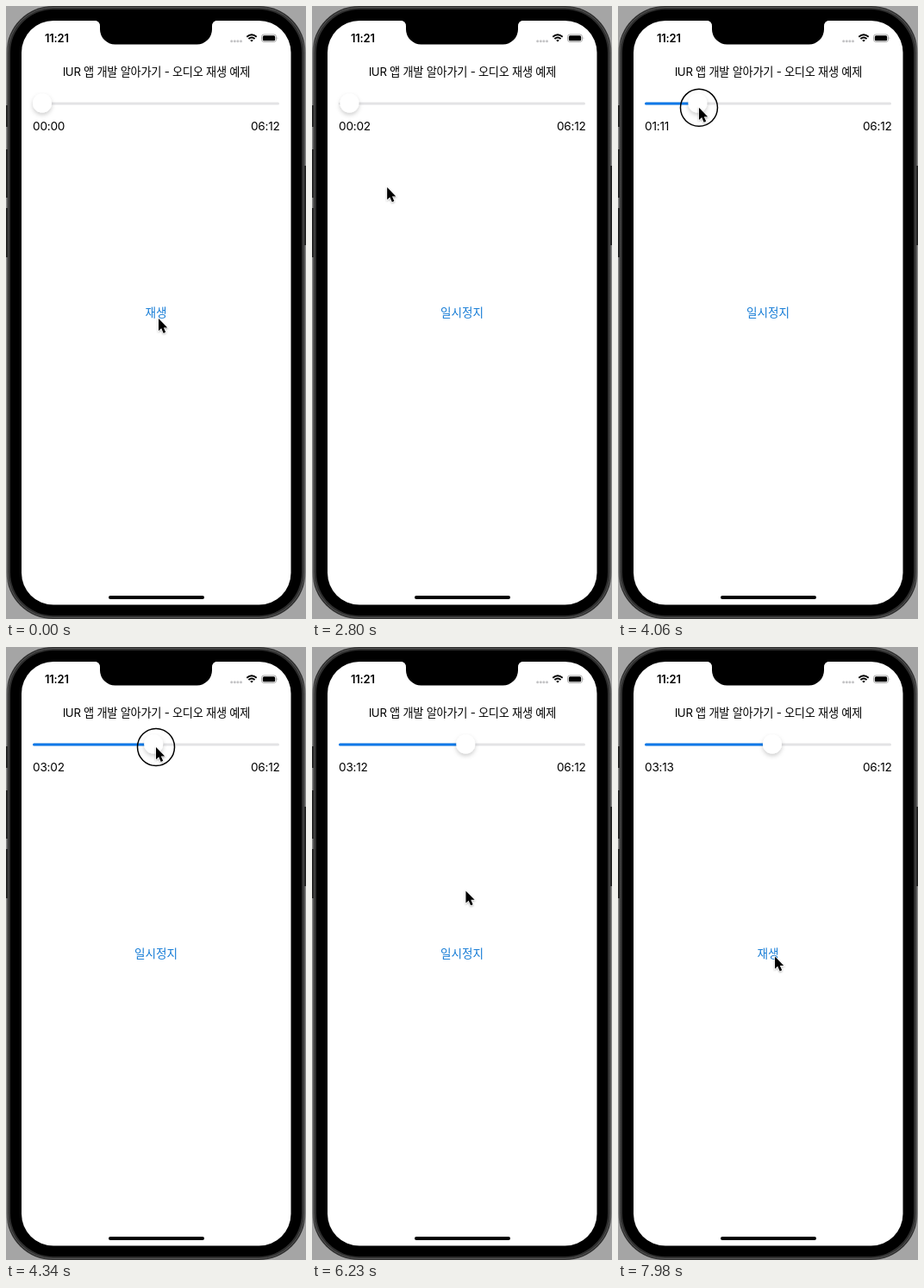
Write an HTML page that moves like this. It is 348 px wide and 710 px high and loops after 8 s.

```html
<!DOCTYPE html>
<html lang="ko">
<head>
<meta charset="utf-8">
<title>오디오 재생</title>
<style>
html, body { margin: 0; width: 100%; height: 100%; overflow: hidden; }
svg { display: block; width: 100%; height: 100%; }
text { font: 13.6px Inter, "Noto Sans CJK KR", "Noto Sans CJK", sans-serif; }
</style>
</head>
<body>
<svg viewBox="0 0 348 710">
  <defs>
    <linearGradient id="rim" x2="1" y2="0">
      <stop offset="0" stop-color="#6b6b6b"/>
      <stop offset=".008" stop-color="#2f2f2f"/>
      <stop offset=".992" stop-color="#2f2f2f"/>
      <stop offset="1" stop-color="#6b6b6b"/>
    </linearGradient>
    <filter id="soft" x="-50%" y="-50%" width="200%" height="200%">
      <feDropShadow dx="0" dy="2.5" stdDeviation="2.4" flood-opacity=".2"/>
    </filter>
    <filter id="lift" x="-50%" y="-50%" width="200%" height="200%">
      <feDropShadow dx="0" dy="1" stdDeviation=".8" flood-opacity=".35"/>
    </filter>
  </defs>

  <!-- phone body -->
  <rect width="348" height="710" fill="#a5a5a5"/>
  <rect x=".5" width="347" height="710" rx="54" fill="url(#rim)"/>
  <rect x="2" y="1.5" width="344" height="707" rx="53" fill="none" stroke="#555" />
  <path d="M0 115h2v25h-2zM0 166h2v56h-2zM0 234h2v57h-2zM346 185h2v92h-2z" fill="#222"/>
  <rect x="5" y="4" width="338" height="702" rx="50"/>
  <rect x="18" y="17" width="312.5" height="676.5" rx="37" fill="#fff"/>
  <path d="M102 16.5q7 .5 7 7v3.500a17.500 17.500 0 0 0 17.500 17.500h95a17.500 17.500 0 0 0 17.500-17.500v-3.500q0-6.500 7-7z"/>
  <rect x="119" y="683" width="111" height="4" rx="2"/>

  <!-- status bar -->
  <text x="45" y="42" style="font-size:13px;font-weight:600" textLength="" letter-spacing="-.2">11:21</text>
  <g fill="#c4c4c6">
    <circle cx="261.700" cy="40.700" r="1.500"/><circle cx="265.300" cy="40.700" r="1.500"/>
    <circle cx="268.900" cy="40.700" r="1.500"/><circle cx="272.500" cy="40.700" r="1.500"/>
  </g>
  <g fill="none" stroke="#000" stroke-width="1.900">
    <path d="M279.300 35.700q5.700-4.900 11.400 0M281.400 38.100q3.600-3 7.200 0"/>
    <path d="M283.200 39.700q1.800-1.300 3.600 0l-1.800 1.900z" fill="#000" stroke="none"/>
  </g>
  <rect x="296.500" y="33" width="17" height="8.500" rx="2.600" fill="none" stroke="#a0a0a0" stroke-width=".9"/>
  <rect x="297.800" y="34.300" width="14.400" height="5.900" rx="1.500"/>
  <path d="M314.600 35.700q1.600 1.500 0 3z" fill="#a0a0a0"/>

  <!-- player -->
  <text x="174.500" y="81" text-anchor="middle" style="font-size:13.2px" letter-spacing="-.25">lUR 앱 개발 알아가기 - 오디오 재생 예제</text>
  <rect x="31" y="111.500" width="286" height="3" rx="1.500" fill="#e3e3e5"/>
  <rect id="bar" x="31" y="111.500" height="3" rx="1.500" fill="#0a78e8"/>
  <circle id="knob" cy="112.500" r="11" fill="#fff" filter="url(#soft)"/>
  <text id="now" x="31" y="143.700" letter-spacing="-.2"></text>
  <text x="317.700" y="143.700" text-anchor="end" letter-spacing="-.2">06:12</text>
  <text id="button" x="174" y="360" text-anchor="middle" fill="#147bd6"></text>

  <g id="pointer">
    <circle id="ring" r="21.500" fill="none" stroke="#000" stroke-width="1.500"/>
    <path d="M0 0V14.200L3.200 11.300L5.700 16.900L8.200 15.800L5.800 10.400H10.200Z" stroke="#fff" stroke-width="1.100" paint-order="stroke" filter="url(#lift)"/>
  </g>
</svg>
<script>
const LOOP = 8000, TICK = 70, TOTAL = 372;
const $ = id => document.getElementById(id);
const [bar, knob, now, button, pointer, ring] =
  ["bar", "knob", "now", "button", "pointer", "ring"].map($);

const linear = u => u;
const smooth = u => u * u * (3 - 2 * u);

// Pointer stops: time, x, y, easing towards the stop
const path = [
  [0, 177, 362, linear],
  [2310, 177, 362, linear],
  [3150, 33, 118.5, smooth],
  [3290, 42, 118, linear],
  [3430, 41.5, 118.5, linear],
  [3850, 42, 119, linear],
  [4340, 174, 116, smooth],
  [4550, 179.8, 116, smooth],
  [4620, 179, 117, linear],
  [5670, 179, 117, linear],
  [5740, 176, 125, linear],
  [6510, 179.5, 350, smooth],
  [6650, 182, 358.5, linear],
  [LOOP, 182, 358.5, linear]
];

function pointerAt(t) {
  const i = path.findIndex(p => p[0] > t);
  const [t0, x0, y0] = path[i - 1], [t1, x1, y1, ease] = path[i];
  const u = ease((t - t0) / (t1 - t0));
  return [x0 + (x1 - x0) * u, y0 + (y1 - y0) * u];
}

// Playback position in seconds; the pointer sets it while dragging
function secondsAt(t, x) {
  if (t < 3430) return (t >= 1680) + (t >= 2730);
  if (t < 4620) return Math.max(0, (x - 42) * 182 / 132);
  return 190 + (t >= 4830) + (t >= 5880) + (t >= 6930);
}

const within = (t, a, b) => t >= a && t < b;
const pad = n => String(n).padStart(2, "0");

function draw(time) {
  const t = Math.floor(time / TICK) * TICK;
  const [x, y] = pointerAt(t);
  const sec = Math.floor(secondsAt(t, x) + 1e-6);
  const cx = 42 + sec / TOTAL * 264;

  pointer.setAttribute("transform", `translate(${x} ${y})`);
  const pressed = within(t, 420, 490) || within(t, 3430, 4620) || within(t, 7070, 7210);
  ring.style.display = pressed ? "" : "none";

  knob.setAttribute("cx", cx);
  bar.setAttribute("width", sec > 5 ? cx - 31 : 0);
  now.textContent = pad(Math.floor(sec / 60)) + ":" + pad(sec % 60);

  button.textContent = within(t, 490, 7210) ? "일시정지" : "재생";
  button.setAttribute("opacity", within(t, 7210, 7350) ? 0.5 + (t - 7210) / 280 : 1);
}

const start = performance.now();
function tick() {
  draw((performance.now() - start) % LOOP);
  requestAnimationFrame(tick);
}
draw(0);
requestAnimationFrame(tick);
</script>
</body>
</html>
```
